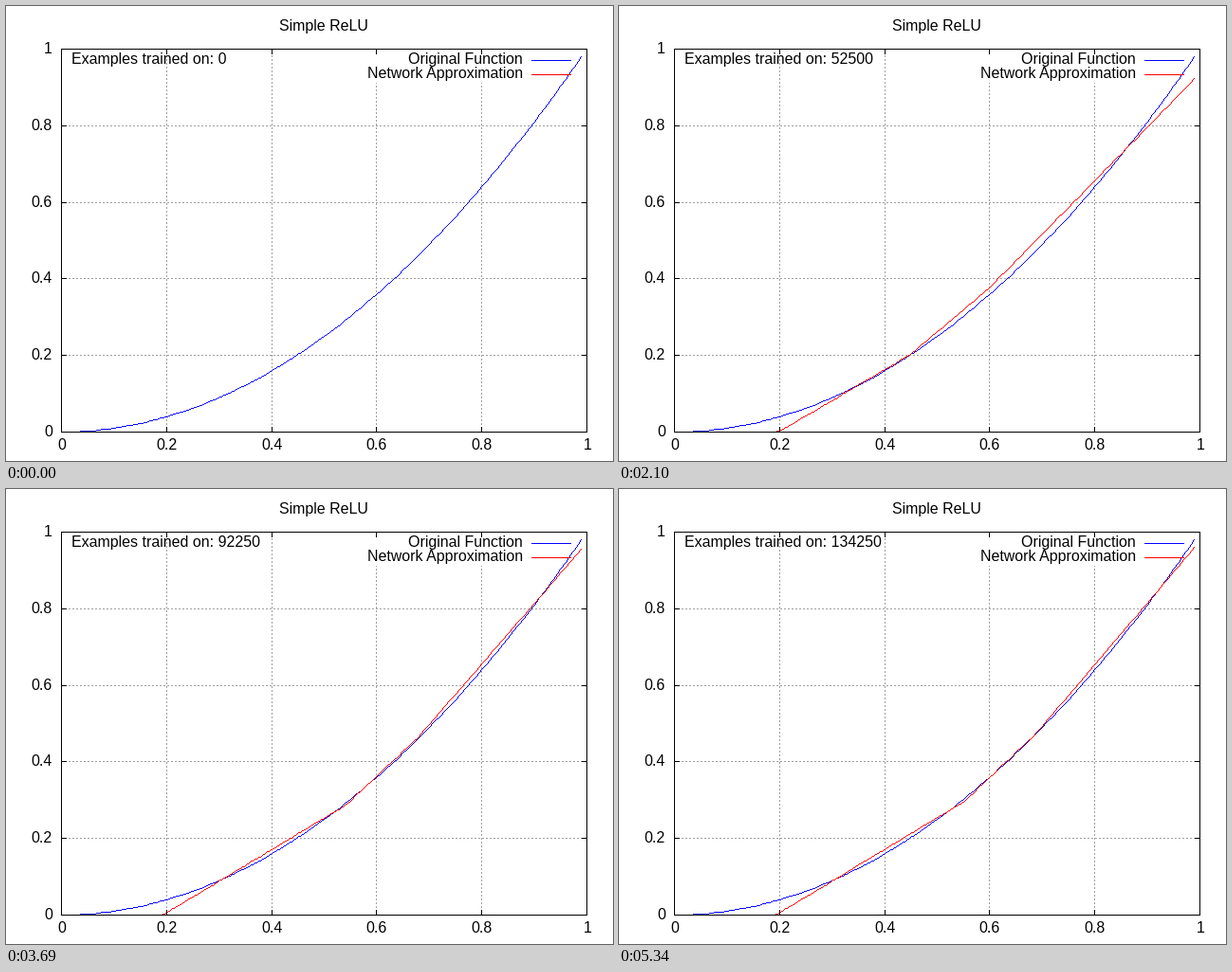
A matplotlib script for the animation above (5.37 s loop, 640 by 480 pixels).

```python
import numpy as np
import matplotlib.pyplot as plt
from matplotlib.animation import FuncAnimation

plt.rcParams["font.family"] = "Liberation Sans"
plt.rcParams["text.hinting"] = "default"

W, H, DPI = 640, 480, 100
LEFT, RIGHT, TOP, BOTTOM = 58, 612, 45, 449
FRAMES, INTERVAL, BATCH = 179, 30, 750
BLACK, GRID, BLUE, RED = (0, 0, 0), (160, 160, 160), (0, 0, 255), (255, 0, 0)

WAKE = 19                           # the network outputs zero before this step
# Bends of the fitted curve, first rough and then settled
ROUGH = np.array([(0, -.16), (.302, .067), (.476, .24), (.99, .869)])
SETTLED = np.array([(0, -.16), (.555, .30), (.69, .477), (.99, .96)])
xs = np.arange(100) / 100


def to_px(x, y):
    px = LEFT + np.asarray(x) * (RIGHT - LEFT)
    py = BOTTOM - np.asarray(y) * (BOTTOM - TOP)
    return np.rint(px).astype(int), np.rint(py).astype(int)


def stroke(img, x, y, color):
    """Polyline of single hard-edged pixels."""
    for x0, y0, x1, y1 in zip(x, y, x[1:], y[1:]):
        n = max(abs(x1 - x0), abs(y1 - y0), 1)
        t = np.arange(n + 1) / n
        cols = np.rint(x0 + t * (x1 - x0)).astype(int)
        rows = np.rint(y0 + t * (y1 - y0)).astype(int)
        img[rows, cols] = color


def smoothstep(n, a, b):
    u = np.clip((n - a) / (b - a), 0, 1)
    return u * u * (3 - 2 * u)


def network(step):
    """Dead at first, then flat, tilting, and swinging into the fit."""
    if step < WAKE:
        return np.zeros_like(xs)
    tilt = 0.14 * min(1, np.exp(0.3 * (step - 32)))
    early = 0.32 + tilt * (np.minimum(xs, 0.75) - 0.53)
    q = 1 - np.exp(-max(0, step - 49) / 24)
    late = np.interp(xs, *(ROUGH + q * (SETTLED - ROUGH)).T)
    w = smoothstep(step, 31, 45)
    return np.maximum((1 - w) * early + w * late, 0)


def draw_grid(img):
    for v in (.2, .4, .6, .8):
        gx, gy = to_px(v, v)
        end = 80 if gx > 375 else TOP           # stop below the legend
        for k in (0, 1):                        # two pixels on, two off
            img[BOTTOM - k:end:-4, gx] = GRID
            img[gy, LEFT + k:RIGHT:4] = GRID


def draw_border(img):
    img[TOP:BOTTOM + 1, [LEFT, RIGHT]] = BLACK
    img[[TOP, BOTTOM], LEFT:RIGHT + 1] = BLACK
    for v in (.2, .4, .6, .8):
        gx, gy = to_px(v, v)
        img[TOP:TOP + 6, gx] = img[BOTTOM - 5:BOTTOM, gx] = BLACK
        img[gy, LEFT:LEFT + 6] = img[gy, RIGHT - 5:RIGHT] = BLACK


base = np.full((H, W, 3), 255, np.uint8)
draw_grid(base)
base[57, 554:596] = BLUE
stroke(base, *to_px(xs, xs ** 2), BLUE)
base[72, 554:596] = RED

fig = plt.figure(figsize=(W / DPI, H / DPI), dpi=DPI, facecolor="white")
ax = fig.add_axes([0, 0, 1, 1])
plot = ax.imshow(base, extent=(0, W, H, 0), interpolation="nearest",
                 aspect="auto")
ax.set(xlim=(0, W), ylim=(H, 0))
ax.axis("off")


def label(x, y, s, ha="center"):
    return ax.text(x, y, s, ha=ha, va="baseline", color="black",
                   fontsize=16 * 72 / DPI)


label(335, 26, "Simple ReLU")
label(545, 61, "Original Function", "right")
label(545, 76, "Network Approximation", "right")
for k in range(6):
    gx, gy = to_px(k / 5, k / 5)
    label(gx + 0.9, 468, f"{k / 5:g}")
    label(49, gy + 5, f"{k / 5:g}", "right")
counter = label(69, 61, "", "left")


def update(i):
    step = i + (i >= 134)           # one batch is skipped late in the run
    img = base.copy()
    stroke(img, *to_px(xs, network(step)), RED)
    draw_border(img)
    plot.set_data(img)
    counter.set_text(f"Examples trained on: {step * BATCH}")
    return plot, counter


anim = FuncAnimation(fig, update, frames=FRAMES, interval=INTERVAL,
                     repeat=True, repeat_delay=0, blit=False)
plt.show()
```
